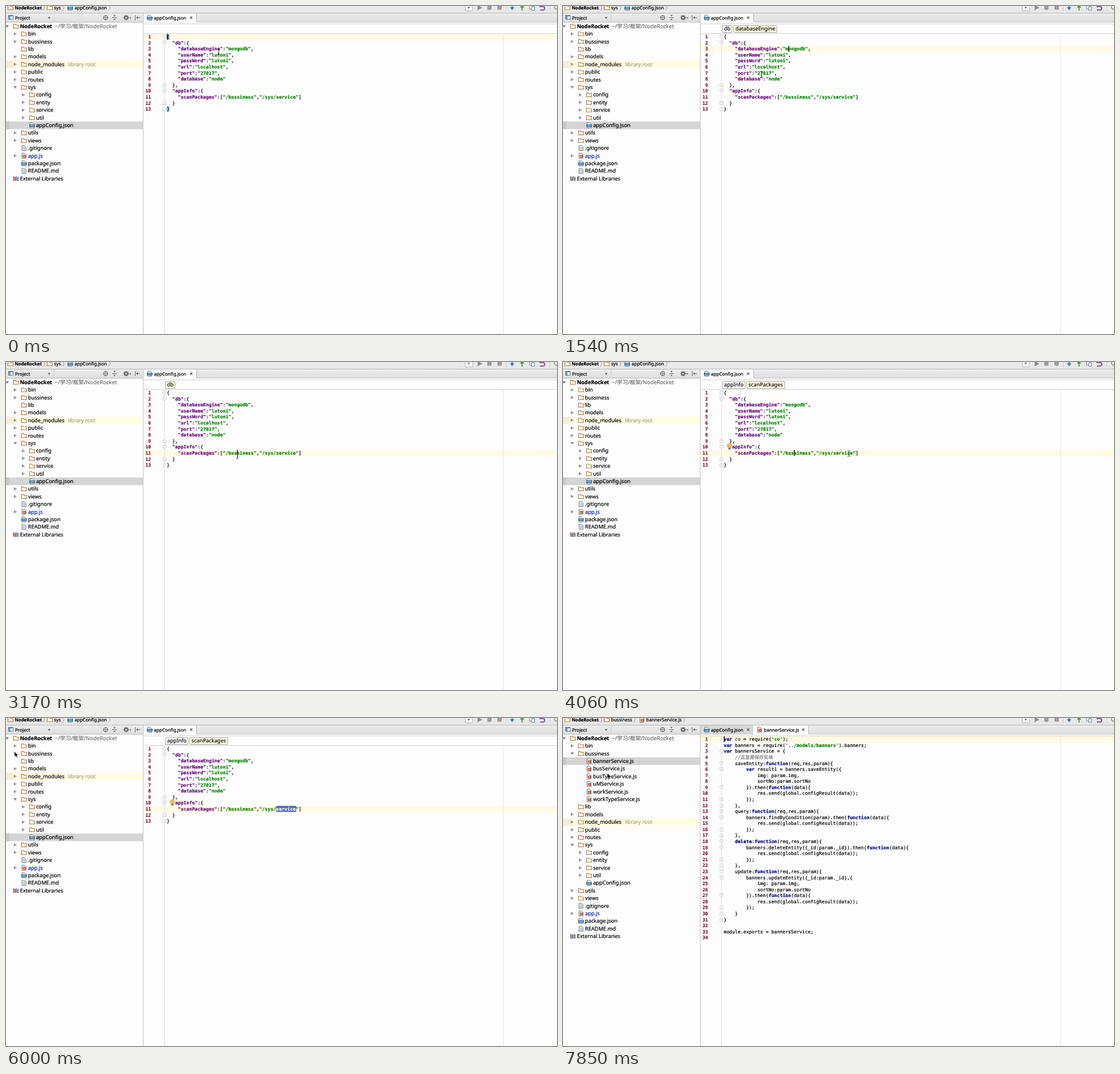
An HTML page with a canvas that plays this animation: 970x577 px, repeating every 7.99 s.

```html
<!DOCTYPE html>
<html lang="en">
<head>
<meta charset="utf-8">
<title>Editor session</title>
<style>
html, body { margin: 0; width: 100%; height: 100%; overflow: hidden; background: #fdfdfd; }
canvas { display: block; }
</style>
</head>
<body>
<canvas id="stage" width="970" height="577"></canvas>
<script>
const ctx = document.getElementById('stage').getContext('2d');
ctx.textRendering = 'geometricPrecision';
ctx.lineJoin = 'round';
const LOOP = 7990;
const SANS = '"Noto Sans", "Noto Sans CJK SC", "Noto Sans CJK", sans-serif';
const MONO = '"DejaVu Sans Mono", "Noto Sans CJK SC", "Noto Sans CJK", monospace';
const UI = 9.3, SMALL = 8.05, CODE = 8.2;
const LEFT = 283, CHAR = 4.937, LINE = 10.574, ROW = 13.4;

const CONFIG = `{
  "db":{
    "databaseEngine":"mongodb",
    "userName":"lutoni",
    "passWord":"lutoni",
    "url":"localhost",
    "port":"27017",
    "database":"node"
  },
  "appInfo":{
    "scanPackages":["/bussiness","/sys/service"]
  }
}`.split('\n');

const SERVICE = `var co = require('co');
var banners = require('../models/banners').banners;
var bannersService = {
    //这里是保存实体
    saveEntity:function(req,res,param){
        var result1 = banners.saveEntity({
            img: param.img,
            sortNo:param.sortNo
        }).then(function(data){
            res.send(global.configResult(data));
        });
    },
    query:function(req,res,param){
        banners.findByCondition(param).then(function(data){
            res.send(global.configResult(data));
        });
    },
    delete:function(req,res,param){
        banners.deleteEntity({_id:param._id}).then(function(data){
            res.send(global.configResult(data));
        });
    },
    update:function(req,res,param){
        banners.updateEntity({_id:param._id},{
            img: param.img,
            sortNo:param.sortNo
        }).then(function(data){
            res.send(global.configResult(data));
        });
    }
}

module.exports = bannersService;
`.split('\n');

// Each entry: depth, arrow state (v open, > closed, - none), name
const TREE = ('0vNodeRocket 1>bin 1>bussiness 1-lib 1>models 1>node_modules 1>public 1>routes 1vsys ' +
  '2>config 2>entity 2>service 2>util 2-appConfig.json 1>utils 1>views 1-.gitignore 1>app.js ' +
  '1-package.json 1-README.md').split(' ').concat('0-External Libraries');
const OPEN_TREE = TREE.flatMap(item => item === '1>bussiness'
  ? ['1vbussiness', ...['banner', 'bus', 'busType', 'uM', 'work', 'workType'].map(n => `2-${n}Service.js`)]
  : item);

// time, x, y of the pointer
const POINTER = [
  [0, 374, 81], [150, 378, 80], [300, 388, 78], [450, 396, 77], [800, 412, 79], [950, 423, 82],
  [1240, 385, 98], [1390, 313, 118], [1540, 349, 120], [1830, 350, 121], [1980, 352, 128],
  [2420, 395, 140], [2720, 396, 143], [2870, 402, 172], [3020, 407, 167], [3170, 407, 165],
  [3470, 433, 160], [3770, 462, 162], [3920, 490, 163], [4060, 503, 161],
  [4660, 400, 120], [4810, 226, 70], [4960, 106, 51], [5110, 60, 40], [5260, 38, 45], [5410, 31, 52],
  [5560, 20, 57], [5710, 15, 59], [6600, 48, 66], [6750, 80, 78], [7050, 81, 79], [7490, 79, 90], [7850, 78, 97]
];
// time, caret line, caret column, breadcrumbs
const CARET = [
  [0, 1, 0, ''], [450, 3, 23, ''], [600, 3, 23, 'db databaseEngine'],
  [1830, 7, 13, 'db databaseEngine'], [1980, 7, 13, 'db port'], [2420, 8, 21, 'db port'],
  [2570, 8, 21, 'db database'], [2720, 9, 4, 'db database'], [2870, 9, 4, 'db'],
  [3020, 11, 25, 'db'], [3470, 11, 25, 'appInfo scanPackages'], [4510, 11, 46, 'appInfo scanPackages'],
  [7490, 1, 0, '']
];
const BLINK_OFF = [[1240, 1540], [5260, 5560], [6000, 7490]];

const latest = (track, t) => track.filter(key => key[0] <= t).pop();
const within = (t, [from, to]) => t >= from && t < to;

function rect(x, y, w, h, fill, stroke) {
  if (fill) { ctx.fillStyle = fill; ctx.fillRect(x, y, w, h); }
  if (stroke) { ctx.strokeStyle = stroke; ctx.lineWidth = 1; ctx.strokeRect(x + .5, y + .5, w - 1, h - 1); }
}

function shape(points, fill, stroke, width = 1) {
  ctx.beginPath();
  for (let i = 0; i < points.length; i += 2) ctx.lineTo(points[i], points[i + 1]);
  if (fill) { ctx.closePath(); ctx.fillStyle = fill; ctx.fill(); }
  if (stroke) { ctx.strokeStyle = stroke; ctx.lineWidth = width; ctx.stroke(); }
}

function ring(x, y, r, color, width = 1, from = 0, to = 7) {
  ctx.beginPath();
  ctx.arc(x, y, r, from, to);
  ctx.strokeStyle = color;
  ctx.lineWidth = width;
  ctx.stroke();
}

// A hairline outline gives the slightly heavy desktop font smoothing
function text(s, x, y, size, color = '#000', style = '', family = SANS) {
  ctx.font = `${style} ${size}px ${family}`;
  ctx.fillStyle = ctx.strokeStyle = color;
  ctx.lineWidth = .22;
  ctx.fillText(s, x, y);
  ctx.strokeText(s, x, y);
}

function gradient(x, y, w, h, top, bottom) {
  const g = ctx.createLinearGradient(0, y, 0, y + h);
  g.addColorStop(0, top);
  g.addColorStop(1, bottom);
  rect(x, y, w, h, g);
}

const kindOf = name => /\.json$/.test(name) ? 'json' : /\.js$/.test(name) ? 'js'
  : /\./.test(name) ? 'text' : /^External/.test(name) ? 'libs' : 'folder';

// Icon about 10px wide, vertically centred on y
function icon(kind, x, y) {
  if (kind === 'folder') {
    shape([x + .5, y + 3.5, x + .5, y - 3.5, x + 4, y - 3.5, x + 5, y - 2, x + 9.5, y - 2, x + 9.5, y + 3.5, x, y + 3.5],
      '#fffaf0', '#b08446', 1.2);
  } else if (kind === 'libs') {
    ['#777', '#b9524a', '#777', '#4c7cab'].forEach((c, i) => rect(x + i * 2.5, y - 4 + i % 2, 1.9, 8 - i % 2, c));
  } else {
    shape([x + 1.5, y - 4.5, x + 6, y - 4.5, x + 8.5, y - 2, x + 8.5, y + 4.5, x + 1.5, y + 4.5, x + 1.5, y - 4.5],
      '#f7f9fb', '#68727f');
    if (kind === 'text') [-2, 0, 2].forEach(d => rect(x + 3, y + d, 4, .8, '#6f87a5'));
    if (kind === 'js') { rect(x + 3, y - 1.5, 5.5, 4.8, '#c4562b'); rect(x + 4.7, y, 2, 1.8, '#f0c094'); }
    if (kind === 'json') { rect(x, y - 1.5, 10, 4.5, '#34729f'); rect(x + 1.5, y + .2, 7, 1, '#c4dcee'); }
  }
}

const down = (x, y, r, color) => shape([x - r, y - r * .6, x + r, y - r * .6, x, y + r * .8], color);
const right = (x, y, r, color) => shape([x - r * .8, y - r, x + r, y, x - r * .8, y + r], color);

function navBar(opened) {
  gradient(0, 0, 970, 12, '#ececec', '#e6e6e6');
  const path = opened ? [['bussiness', 72], ['bannerService.js', 134]] : [['sys', 72], ['appConfig.json', 108]];
  const chevron = x => shape([x - 1.5, -2, x + 1.5, 3, x - 1.5, 8], null, '#999');
  icon('folder', 3, 3);
  text('NodeRocket', 15.5, 6, 7.8, '#000', 'bold');
  chevron(67);
  for (const [name, x] of path) {
    icon(kindOf(name), x, 3);
    text(name, x + 12.7, 6, SMALL);
    chevron(x + 17 + ctx.measureText(name).width);
  }
  rect(808, -3, 14, 12, '#fafafa', '#b5b5b5');
  down(814.5, 3, 2.3, '#666');
  right(834, 3, 4.5, '#8c8c8c');
  for (const x of [851, 869]) {
    ring(x, 3, 2.6, '#909090', 2.4);
    shape([x - 4, 0, x + 4, 6], null, '#999');
    shape([x + 4, 0, x - 4, 6], null, '#999');
  }
  rect(880, 0, 1, 9, '#c8c8c8');
  shape([891, -2, 891, 6], null, '#3c82b5', 2);
  down(891, 4.5, 4, '#3c82b5');
  shape([908.5, 8, 908.5, 1], null, '#4a9a4a', 2);
  shape([904.5, 3, 912.5, 3, 908.5, -2], '#4a9a4a');
  rect(921, -2, 7, 8, '#dfe7ee', '#8590a0');
  rect(925, 1, 6, 7, '#f7f7f7', '#5f8cae');
  shape([939, 1, 946, 1], null, '#83479d', 1.8);
  ring(945.5, 4, 3, '#83479d', 1.8, -1.6, 1.8);
  shape([945, 7, 940, 7], null, '#83479d', 1.8);
  rect(957, 0, 1, 9, '#c8c8c8');
  ring(969, 2, 3.5, '#777', 1.3);
  rect(0, 12, 970, 1, '#b9b9b9');
}

function treeHeader(focused) {
  gradient(0, 13, 241, 15, ...(focused ? ['#d3deeb', '#b9cbe0'] : ['#ededed', '#dedede']));
  rect(0, 28, 241, 1, '#b8b8b8');
  rect(84, 13, 1, 15, focused ? '#a9bbd0' : '#cdcdcd');
  rect(4, 16, 9, 8, '#eef3f7', '#66788c');
  rect(4, 16, 9, 2, '#66788c');
  rect(5, 18, 3, 5, '#78a2c4');
  text('Project', 16, 23.5, SMALL);
  down(76, 21, 2.3, '#555');
  ring(175.5, 20.5, 3.6, '#666', 1.2);
  for (const [dx, dy] of [[1, 0], [0, 1]])
    shape([175.5 - dx * 4, 20.5 - dy * 4, 175.5 + dx * 4, 20.5 + dy * 4], null, '#666', .8);
  rect(187, 20, 8, 1, '#666');
  down(191, 17, 2, '#666');
  shape([189, 24.5, 193, 24.5, 191, 22], '#666');
  ring(211.5, 20.5, 2.5, '#666', 2);
  ctx.setLineDash([1.5, 1.4]);
  ring(211.5, 20.5, 4, '#666', 1.5);
  ctx.setLineDash([]);
  down(219, 21, 1.8, '#666');
  rect(227, 16, 1, 9, '#666');
  shape([232, 18, 229, 20.5, 232, 23], '#666');
  rect(231, 20, 5, 1, '#666');
}

function tree(t) {
  const focused = within(t, [6450, 7850]);
  const selected = t < 7050 ? 'appConfig.json' : 'bannerService.js';
  rect(0, 29, 241, 548, '#fdfdfd');
  treeHeader(focused);
  (t < 6450 ? TREE : OPEN_TREE).forEach((item, i) => {
    const depth = +item[0], arrow = item[1], name = item.slice(2);
    const x = 12.5 + 14.2 * depth, y = 35.6 + ROW * i, chosen = name === selected;
    if (chosen) {
      rect(0, y - 6.6, 241, ROW, focused ? '#3b73d7' : '#d4d4d4');
      rect(0, y - 6.6, 6, ROW, focused ? '#3568c8' : '#c9c9c9');
    }
    if (name === 'node_modules') {
      rect(0, y - 6.6, 241, ROW, '#fffde2');
      rect(0, y - 6.6, 14, ROW, '#f5eed9');
    }
    if (arrow === 'v') down(x - 10.5, y, 3.2, '#888');
    if (arrow === '>') right(x - 10.5, y, 3, '#999');
    icon(kindOf(name), x, y);
    const root = i === 0;
    text(name, x + 12, y + 3.1, UI,
      chosen && focused ? '#fff' : name === 'app.js' ? '#0a1fae' : '#000', root ? 'bold' : '');
    if (root) text('~/学习/框架/NodeRocket', 86, y + 3.1, 9.6, '#777');
    if (name === 'node_modules') text('library root', 109, y + 3.1, UI, '#a0a08e');
  });
  rect(241, 13, 1, 564, '#c2c2c2');
}

function tabs(opened) {
  gradient(242, 13, 728, 15, '#ebebeb', '#dfdfdf');
  rect(242, 28, 728, 3, '#fdfdfd');
  rect(242, 28, 728, 1, '#c6c6c6');
  const tab = (name, x, w, active) => {
    rect(x, 13, w, active ? 16 : 15, active ? '#fdfdfd' : '#d8d8d8');
    rect(x + w, 13, 1, 15, '#b5b5b5');
    icon(kindOf(name), x + 6, 20.5);
    text(name, x + 18.5, 23.5, SMALL);
    const c = x + w - 9;
    shape([c - 2, 18.5, c + 2, 22.5], null, '#555', 1.1);
    shape([c + 2, 18.5, c - 2, 22.5], null, '#555', 1.1);
  };
  tab('appConfig.json', 242, 93, !opened);
  if (opened) tab('bannerService.js', 335, 97, true);
  rect(242, 31, 728, 1, '#d2d2d2');
}

function breadcrumbs(crumbs) {
  rect(242, 32, 728, 16, '#fdfdfd');
  rect(242, 48, 728, 1, '#d2d2d2');
  let x = 280;
  crumbs.split(' ').filter(Boolean).forEach((name, i, all) => {
    ctx.font = `${UI}px ${SANS}`;
    const w = Math.round(ctx.measureText(name).width + 7);
    rect(x, 34, w, 13, i === all.length - 1 ? '#ffffdf' : '#fdfdfd', '#a9a9a0');
    text(name, x + 3.5, 43.3, UI, '#111');
    x += w + 2;
  });
}

const TOKENS = /(\/\/.*|"[^"]*"(?=:)|"[^"]*"|'[^']*'|\b(?:var|function|delete)\b|\bco(?= =))/;

function tokenStyle(token, next) {
  if (token.startsWith('//')) return ['#808080', ''];
  if (/^["']/.test(token)) return [next.startsWith(':') ? '#660e7a' : '#008000', 'bold'];
  return token === 'co' ? ['#333', 'italic'] : ['#000080', 'bold'];
}

function codeLine(line, y) {
  let col = 0;
  line.split(TOKENS).forEach((token, i, all) => {
    const [color, style] = i % 2 ? tokenStyle(token, all[i + 1]) : ['#000', ''];
    text(token, LEFT + col * CHAR, y + 3, CODE, color, style, MONO);
    col += token.length;
  });
}

function foldMark(y, dir) {
  shape([276, y - 3 * dir, 282, y - 3 * dir, 282, y + dir, 279, y + 3.5 * dir, 276, y + dir, 276, y - 3 * dir],
    '#fdfdfd', '#c6c6c6', .9);
  rect(277.5, y - .5, 3, .8, '#c0c0c0');
}

function bulb() {
  ctx.beginPath();
  ctx.arc(293, 147.5, 3.8, 0, 7);
  ctx.fillStyle = '#f7bd4d';
  ctx.fill();
  ring(293, 147.5, 3.8, '#d9962c', .8);
  rect(291.2, 151, 3.6, 3, '#777');
}

function editor(t) {
  const opened = t >= 7490;
  const lines = opened ? SERVICE : CONFIG;
  const lineY = n => (opened ? 37.3 : 54.2) + (n - 1) * LINE;
  const [, line, col, crumbs] = latest(CARET, t);
  tabs(opened);
  if (!opened) breadcrumbs(crumbs);
  rect(242, lineY(line) - 5.3, 728, LINE, '#fffae3');
  const top = opened ? 32 : 49;
  rect(278.5, top, 1, 577 - top, '#dedede');
  rect(875, top, 1, 577 - top, '#e8e8e8');
  if (t < 450) [1, 13].forEach(n => rect(LEFT, lineY(n) - 5, 5, 10, '#9cccf5'));
  ctx.textAlign = 'right';
  lines.forEach((_, i) => text(i + 1, 255.3, lineY(i + 1) + 3, CODE, '#861c30', 'bold', MONO));
  ctx.textAlign = 'left';
  lines.forEach((s, i) => {
    const y = lineY(i + 1);
    if (s.endsWith('{')) foldMark(y, 1);
    else if (/^\s*}/.test(s)) foldMark(y, -1);
    codeLine(s, y);
  });
  if (within(t, [4510, 7490])) {
    const x = LEFT + 39 * CHAR, y = lineY(11);
    rect(x, y - 5.3, 7 * CHAR + .8, LINE, '#4f69ad');
    text('service', x, y + 3, CODE, '#fff', 'bold', MONO);
  }
  if (within(t, [3770, 4510]) || within(t, [5560, 7490])) bulb();
  if (!BLINK_OFF.some(span => within(t, span)))
    rect(LEFT + col * CHAR + .2, lineY(line) - 5.2, 1.4, 10.4, '#000');
}

function pointer(t) {
  const [, x, y] = latest(POINTER, t);
  if (x < 242) {
    shape([x, y, x, y + 9.5, x + 2.2, y + 7.6, x + 3.8, y + 11, x + 5.4, y + 10.2, x + 3.9, y + 7, x + 6.8, y + 7, x, y],
      '#000', '#fff', .7);
    return;
  }
  const ink = '#333';
  shape([x + .5, y - 4, x + .5, y + 4], null, ink, .9);
  for (const d of [-1, 1])
    shape([x - 2, y + 5.2 * d, x - .3, y + 5 * d, x + .5, y + 4 * d, x + 1.3, y + 5 * d, x + 3, y + 5.2 * d], null, ink, .8);
  shape([x - 1, y + 2, x + 2, y + 2], null, ink, .7);
}

function draw(now) {
  const t = now % LOOP;
  rect(0, 0, 970, 577, '#fdfdfd');
  navBar(t >= 7490);
  tree(t);
  editor(t);
  pointer(t);
}

const start = performance.now();
function tick() {
  draw(performance.now() - start);
  requestAnimationFrame(tick);
}
tick();
</script>
</body>
</html>
```
